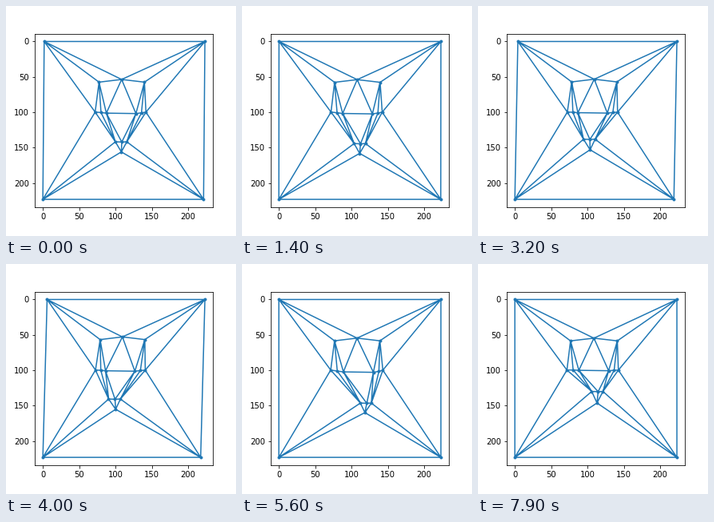
Recreate the animation shown at these times as a matplotlib script. Size 288x288 px, loop 8000 ms.

```python
import numpy as np
import matplotlib.pyplot as plt
from matplotlib.animation import FuncAnimation

FRAMES, STEP = 80, 100  # count, ms
SIDE = 223
MARGIN = 0.05 * SIDE

# head poses: time (ms), yaw, pitch
KEYS = [(0, 0.6, 0.7), (1400, 4.4, 3.2), (2300, 0, -6), (4000, -8.7, -0.4),
        (5600, 13, 5.3), (6900, -12.5, -0.4), (7900, 6.6, -11.1)]

# mesh edges as strokes through named points
STROKES = ("abcda aptqb atb aud bzc upv pwt txq yqz uvwxyz "
           "ulv lwn nxr yrz lnrkl nk ldkcr").split()


def head_pose(ms):
    """Ease smoothly from one key pose to the next."""
    for (t0, *start), (t1, *end) in zip(KEYS, KEYS[1:]):
        if ms <= t1:
            break
    s = (ms - t0) / (t1 - t0)
    s = s * s * (3 - 2 * s)
    return [p + s * (q - p) for p, q in zip(start, end)]


def mesh_points(ms):
    yaw, pitch = head_pose(ms)
    skew = max(0, 2.1 - 0.43 * yaw)
    top_y = 53.6 + 0.09 * yaw - 0.04 * pitch
    brow_y = top_y + 3.8
    eye_dy = 0.12 * pitch + 0.04 * yaw
    nose, mouth = 108 + yaw, 141 + pitch
    return {
        # corners
        "a": (skew, 0), "b": (SIDE, 0),
        "c": (SIDE - skew, SIDE), "d": (0, SIDE),
        # brows and top
        "p": (76.6 + 0.38 * skew, brow_y),
        "t": (108 + 0.25 * skew - 0.07 * pitch, top_y),
        "q": (139.7 + 0.1 * skew - 0.12 * pitch, brow_y),
        # eyes
        "u": (72 - 0.05 * yaw, 99.7),
        "v": (80 + 0.03 * yaw, 100.3 + 0.7 * eye_dy),
        "w": (87.3 + 0.12 * yaw, 101.1 + eye_dy),
        "x": (128 + 0.16 * yaw, 101.7 + eye_dy),
        "y": (135.6 + 0.16 * yaw, 100.7 + 0.7 * eye_dy),
        "z": (141.8 + 0.1 * yaw, 99.8),
        # mouth and chin
        "l": (nose - 8.8, mouth),
        "n": (nose, mouth + 0.3),
        "r": (nose + 7 - 0.05 * yaw, mouth),
        "k": (107.5 + 0.84 * yaw, 155.4 + 0.83 * pitch),
    }


plt.rcParams["font.family"] = "DejaVu Sans"
fig = plt.figure(figsize=(4, 4), dpi=72, facecolor="white")
fig.subplots_adjust(left=0.125, right=0.9, bottom=0.125, top=0.88)
ax = fig.add_subplot()
ax.set_xlim(-MARGIN, SIDE + MARGIN)
ax.set_ylim(SIDE + MARGIN, -MARGIN)
ax.set_xticks(range(0, 201, 50))
ax.set_yticks(range(0, 201, 50))
edges, = ax.plot([], [], "-", color="C0", lw=1.5)
dots, = ax.plot([], [], ".", color="C0", ms=6)


def draw(frame):
    pts = mesh_points(frame * STEP)
    path = []
    for stroke in STROKES:
        path += [pts[name] for name in stroke] + [(np.nan, np.nan)]
    edges.set_data(*np.array(path).T)
    dots.set_data(*np.array(list(pts.values())).T)
    return edges, dots


anim = FuncAnimation(fig, draw, frames=FRAMES, interval=STEP,
                     repeat=True, repeat_delay=0)
plt.show()
```
